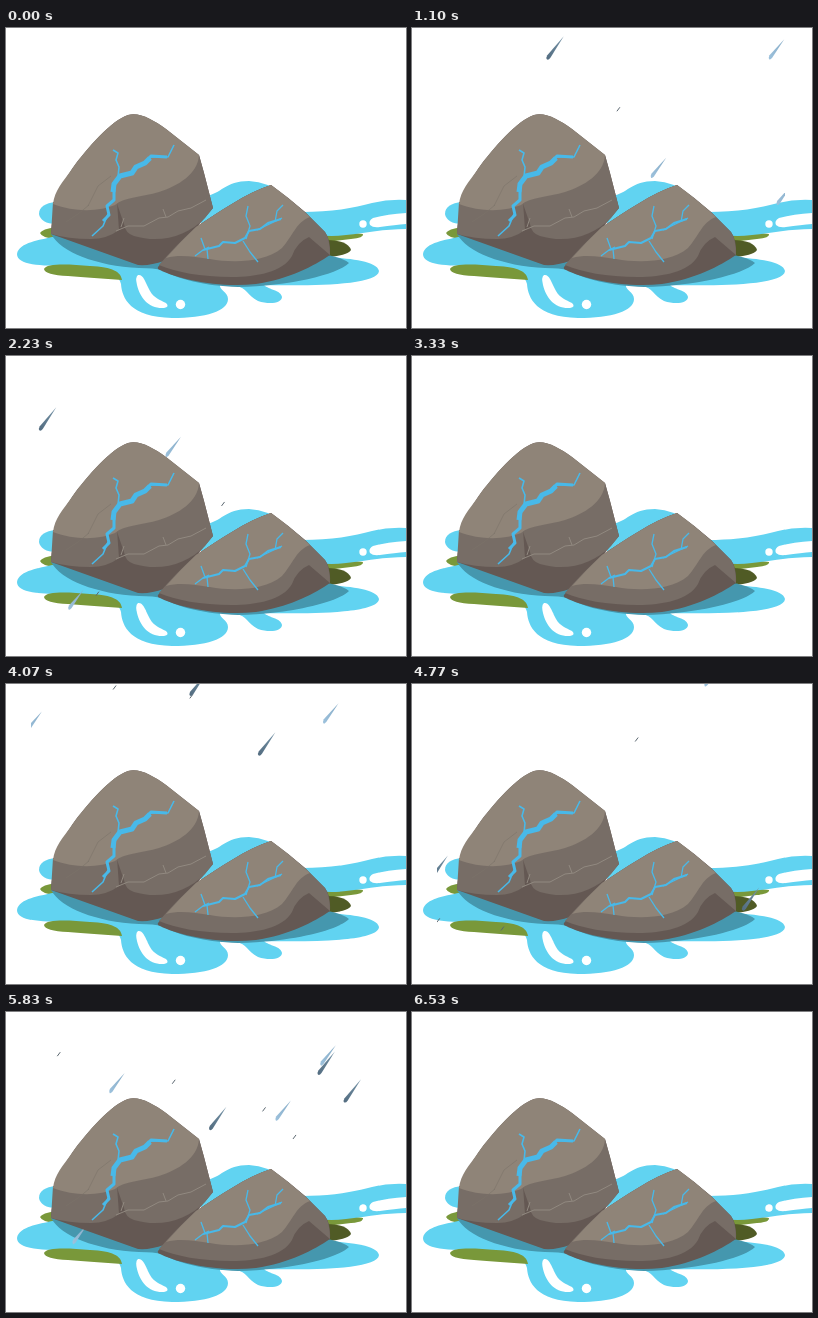
Animation, 400 px wide and 300 px high, one loop 6630 ms. Source, as an HTML page:

```html
<!DOCTYPE html>
<html lang="en">
<head>
<meta charset="utf-8">
<title>Rain on rocks</title>
<style>
  html, body { margin: 0; width: 100%; height: 100%; overflow: hidden; background: #fff; }
  svg { display: block; width: 100vw; height: 100vh; }
  .water { fill: #61d3f1; }
  .shade { fill: #4597ae; }
  .lit { fill: #8f8478; }
  .mid { fill: #776d66; }
  .dark { fill: #645853; }
  .crack { fill: none; stroke: #48b9e9; stroke-linejoin: round; }
  .seam { fill: none; stroke: #918980; }
</style>
</head>
<body>
<svg viewBox="0 0 400 300" preserveAspectRatio="none">
  <defs>
    <clipPath id="sky"><rect x="25" width="348" height="258"/></clipPath>
    <linearGradient id="darkDrop" x1="1" y1="0" x2="0" y2="1">
      <stop offset="0" stop-color="#7594a8"/><stop offset="1" stop-color="#526b7f"/>
    </linearGradient>
    <linearGradient id="lightDrop" x1="1" y1="0" x2="0" y2="1">
      <stop offset="0" stop-color="#86abc6"/><stop offset="1" stop-color="#9dc2dd"/>
    </linearGradient>
    <path id="dark" d="M16-23L2.6-1.5Q.5 1.3-1 0Q-2-1.5-.5-4Z" fill="url(#darkDrop)"/>
    <path id="light" d="M14.5-20L2.4-1.5Q.4 1-.6 0Q-1.5-1.5-.3-4Z" fill="url(#lightDrop)"/>
    <path id="speck" d="M0 0L3-4" stroke="#5b6770"/>
  </defs>

  <g id="ground">
    <path fill="#79983a" d="M50 199Q36 201 34 205Q36 210 50 211ZM320 206Q340 203 357 206Q358 210 345 211L320 214Z"/>
    <path fill="#505b25" d="M320 212Q342 212 345 222Q341 228 320 229Z"/>
    <g class="water">
      <path d="M50 174C39 175 33 179 33 186C34 192 40 196 50 196Z"/>
      <path d="M200 168C215 166 219 153 243 153Q263 154 275 166L270 195H195Z"/>
      <path d="M296 184C325 184 348 180 366 175Q383 171 400 172V201C378 201 360 205 340 207Q325 209 312 207Z"/>
      <path d="M46 209C35 212 13 214 11 226C11 237 35 238 62 238C92 239 112 242 115 256C116 270 124 289 166 290C200 290 222 283 222 271C222 264 213 262 214 257L230 258C241 260 241 267 252 273C264 277 276 275 276 269C275 262 263 262 258 257C300 258 372 258 373 243C371 233 345 231 324 229L200 205Z"/>
    </g>
    <path fill="#79983a" d="M38 241C40 235 63 236 84 238C107 239 115 244 116 252C98 251 78 249 62 248Q39 247 38 241Z"/>
    <path class="shade" d="M45 206C55 224 90 238 133 240Q148 240 156 242C171 251 199 258 232 259C282 258 331 247 343 235Q337 230 322 227L200 200Z"/>
    <g fill="#fff">
      <path d="M132 247C137 246 139 253 144 263C148 270 154 272 160 275Q164 279 158 280C143 281 134 270 131 257Q129 249 132 247Z"/>
      <circle cx="174.5" cy="276.5" r="4.7"/>
      <circle cx="357" cy="196" r="3.7"/>
      <path d="M400 185Q382 186 367 190Q362 193 364 197Q367 200 374 199Q389 197 400 196Z"/>
    </g>
  </g>

  <g id="rain" clip-path="url(#sky)"></g>

  <g id="back-rock">
    <path class="dark" d="M45 206C46 184 54 158 66 141C81 120 106 92 122 87C134 84 147 92 160 101L193 127L198 145L207 180L186 205Q169 220 158 233Q144 238 132 237Z"/>
    <path class="mid" d="M193 127L198 145L207 180L199 190C181 208 155 216 128 208Q119 205 118 196L109 170Z"/>
    <path class="mid" d="M45 206L47 174L111 174L113 202Q101 211 85 211Q62 211 45 206Z"/>
    <path class="lit" d="M47 176C49 162 56 155 66 141C81 120 106 92 122 87C134 84 147 92 160 101L193 127C192 146 172 158 153 164C136 169 118 169 109 177C95 183 70 185 47 176Z"/>
    <path class="seam" d="M110 203L122 198L138 198L153 190L162 189L172 183L185 180L200 172M160 189L157 181M115 199L118 190"/>
    <path class="seam" stroke-opacity=".6" d="M60 194L72 186L83 177M82 178L92 158L105 148" style="stroke:#7c736a"/>
    <g class="crack">
      <path stroke-width="1.6" d="M168 117L162 129L145 129M112 149L113 139L110 132L112 125L107 122M102 186L97 198L86 208"/>
      <path stroke-width="3" d="M161 129L145 128L140 134M108 160L108 172L101 178L103 187L97 193"/>
      <path stroke-width="5" d="M144 130L139 135L130 139L126 145L114 148L108 156L107 164"/>
    </g>
  </g>

  <g id="front-rock">
    <path class="dark" d="M152 239Q170 217 190 199C213 184 240 165 265 157Q282 169 299 184L319 204Q325 212 324 227C308 238 283 251 250 256C211 260 172 251 154 242Q151 241 152 239Z"/>
    <path class="mid" d="M153 237Q170 217 190 199C213 184 240 165 265 157L299 184L319 204Q324 211 324 227L303 209Q291 214 286 228C277 244 250 249 226 249C195 249 169 244 153 237Z"/>
    <path class="lit" d="M160 230Q174 214 190 199C213 184 240 165 265 157Q282 169 304 189C290 194 287 208 276 220C258 235 226 235 204 231C189 229 174 226 160 230Z"/>
    <g class="crack">
      <path stroke-width="1.3" d="M189 228L197 222L203 219M240 211L244 198L240 188L242 178M237 213L244 224L252 234M199 221L195 210M201 221L202 231M269 194L271 183L277 177M251 202L276 190"/>
      <path stroke-width="2" d="M197 222L213 218L217 214L229 215L239 210L243 203L254 201L262 195L275 191"/>
    </g>
  </g>
</svg>
<script>
  const LOOP = 6630, SHOWER = LOOP / 2;
  const SPEED = 0.46, SLOW = 0.32, SLANT = 0.71, GROUND = 256;

  const rain = document.getElementById('rain');
  const drops = [];

  // A drop crosses the top edge at time t and place x.
  function addDrop(kind, t, x, speed = SPEED) {
    const el = document.createElementNS('http://www.w3.org/2000/svg', 'use');
    el.setAttribute('href', '#' + kind);
    rain.append(el);
    drops.push({ el, t, x, speed });
  }

  const keyDrops = {
    speck: [[711, 194, SLOW], [744, 111], [920, 264], [1331, 264], [1503, 264], [1905, 322]],
    dark: [[601, 304], [731, 193], [964, 492], [1033, 158], [1696, 395], [1999, 87, SLOW]],
    light: [[633, 346, SLOW], [653, 55], [717, 491], [1033, 380], [1451, 295], [2012, 232]]
  };
  for (const kind in keyDrops) {
    for (const drop of keyDrops[kind]) addDrop(kind, ...drop);
  }

  let seed = 7;
  const random = () => (seed = seed * 16807 % 2147483647) / 2147483647;
  const kinds = Object.keys(keyDrops);

  // Scatters drops over a span of time and a span of the top edge.
  function addWave(count, start, length, left, width) {
    for (let i = 0; i < count; i++) {
      addDrop(kinds[i % kinds.length], start + length * i / count, left + width * random());
    }
  }
  addWave(4, 300, 120, 230, 60);
  addWave(4, 1620, 120, 230, 40);
  addWave(10, 2240, 200, 60, 420);

  function draw(now) {
    const time = now % SHOWER;
    for (const { el, t, x, speed } of drops) {
      const y = (time - t) * speed;
      const shown = y > -2 && y < GROUND;
      el.style.display = shown ? '' : 'none';
      if (shown) el.setAttribute('transform', `translate(${x - y * SLANT} ${y})`);
    }
  }

  const start = performance.now();
  function tick() {
    draw(performance.now() - start);
    requestAnimationFrame(tick);
  }
  tick();
</script>
</body>
</html>
```
